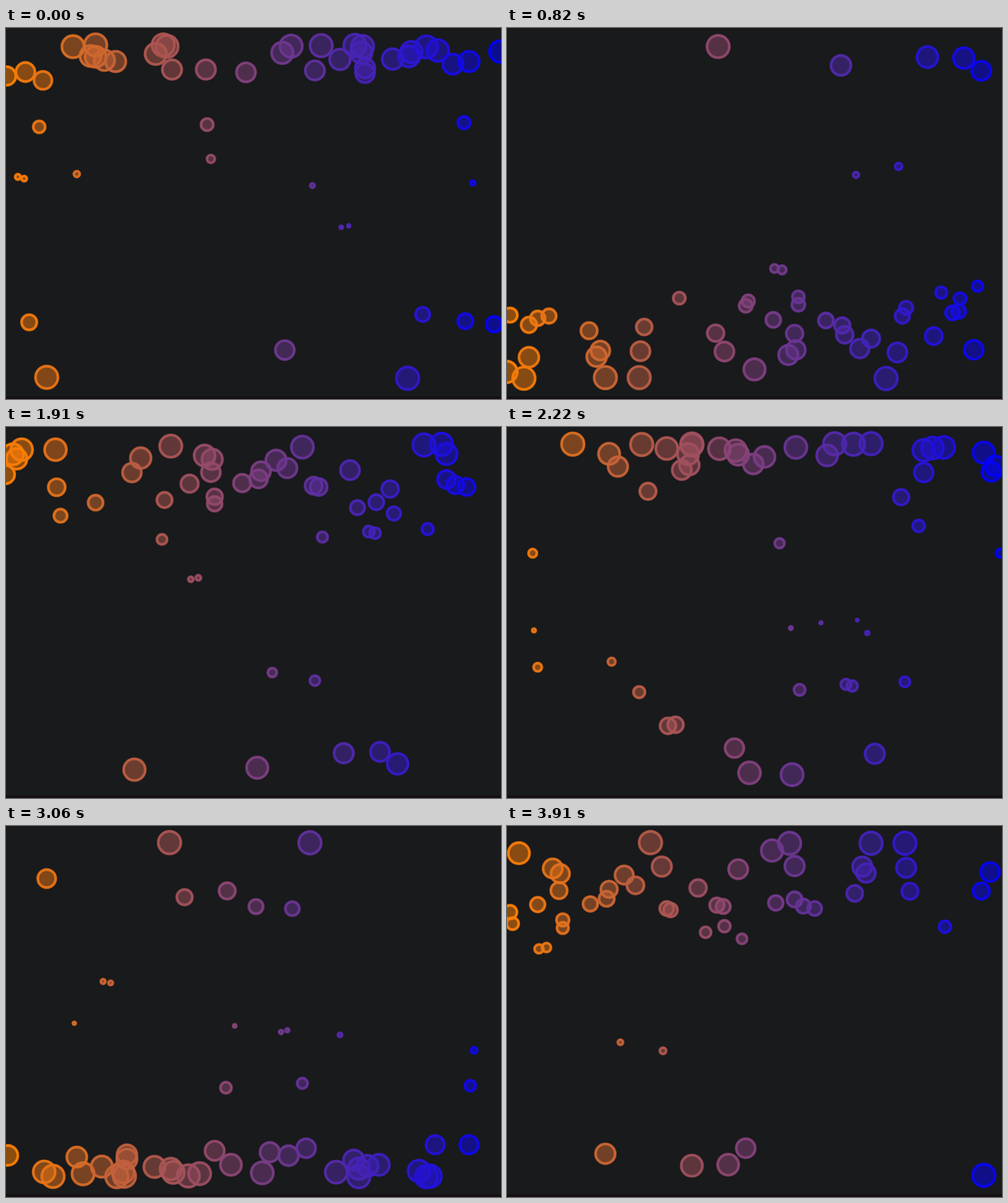
Write an HTML page with a canvas that moves like this. It is 790 px wide and 592 px high and loops after 3.98 s.

```html
<!DOCTYPE html>
<html lang="en">
<head>
<meta charset="utf-8">
<title>Drifting circles</title>
<style>
  html, body { margin: 0; width: 100%; height: 100%; overflow: hidden; background: #191a1c; }
  canvas { display: block; }
</style>
</head>
<body>
<canvas id="stage" width="790" height="592"></canvas>
<script>
const ctx = document.getElementById('stage').getContext('2d');
const LOOP = 3980;
const WRAP = 800;
const MID = 293;
const SWING = 266.5;

// Start x and start angle (degrees) of each circle.
const circles = [
  [1, -125.7], [19, -12], [29, -11.4], [31, -123.3], [37, 138.5], [53, -30.5],
  [59, -128.2], [65, 82.8], [107, -81], [113, -13], [135, -68.7], [143, -94],
  [143, -112], [157, -115], [175, -116], [239, -109.2], [251, -94.4], [257, -98.4],
  [265, -58.3], [319, -58.3], [321, -31.4], [327, -18.4], [383, -123.5], [441, -108],
  [445, 124], [455, -97.8], [489, -9], [493, -122.3], [503, -83.8], [533, -114.3],
  [535, 5.4], [547, 4.9], [557, -95.6], [567, -107.8], [569, -98.8], [573, -124],
  [573, -120.8], [617, -114], [641, 86.4], [643, -111.7], [647, -107.2], [665, 38],
  [671, -99.6], [689, -105.2], [713, -62], [731, -32.2], [733, 41], [739, -116],
  [745, -9.9], [779, 137.6], [789, -106.5]
];

// The drift runs in ticks; its pace varies slightly: [step, tick].
const pace = [[0, 0], [12, 54], [20, 93], [26, 120], [35, 163], [46, 213], [52, 242]];

function stepAt(ms) {
  if (ms < 661) return Math.min(9, Math.floor(ms / 65.5));
  return Math.min(52, 10 + Math.floor((ms - 661) / 77.14));
}

function tickAt(step) {
  const i = Math.max(1, pace.findIndex(([s]) => s >= step));
  const [s0, t0] = pace[i - 1];
  const [s1, t1] = pace[i];
  return Math.round(t0 + (t1 - t0) * (step - s0) / (s1 - s0));
}

function colorAt(x) {
  const k = Math.min(1, Math.max(0, x / 790));
  return `rgb(${255 * (1 - k)}, ${128 * (1 - k)}, ${255 * k})`;
}

function drawCircle(x, swing) {
  const y = MID + SWING * swing;
  const radius = 3.2 + 17.3 * Math.abs(swing);
  ctx.fillStyle = ctx.strokeStyle = colorAt(x);
  ctx.globalAlpha = 0.5;
  ctx.beginPath();
  ctx.arc(x, y, radius, 0, 2 * Math.PI);
  ctx.fill();
  ctx.globalAlpha = 0.93;
  ctx.lineWidth = 3.9;
  ctx.beginPath();
  ctx.arc(x, y, radius - 2.7, 0, 2 * Math.PI);
  ctx.stroke();
}

function draw(tick) {
  ctx.globalAlpha = 1;
  ctx.fillStyle = '#191a1c';
  ctx.fillRect(0, 0, 790, 592);
  for (const [startX, degrees] of circles) {
    const x = (startX - 2 * tick + 1 + WRAP) % WRAP - 1;
    drawCircle(x, Math.sin(degrees * Math.PI / 180 + tick * 0.05));
  }
  ctx.globalAlpha = 1;
  ctx.fillStyle = '#150f15';
  ctx.fillRect(0, 588, 790, 4);
}

const start = performance.now();
function animate() {
  draw(tickAt(stepAt((performance.now() - start) % LOOP)));
  requestAnimationFrame(animate);
}
animate();
</script>
</body>
</html>
```
